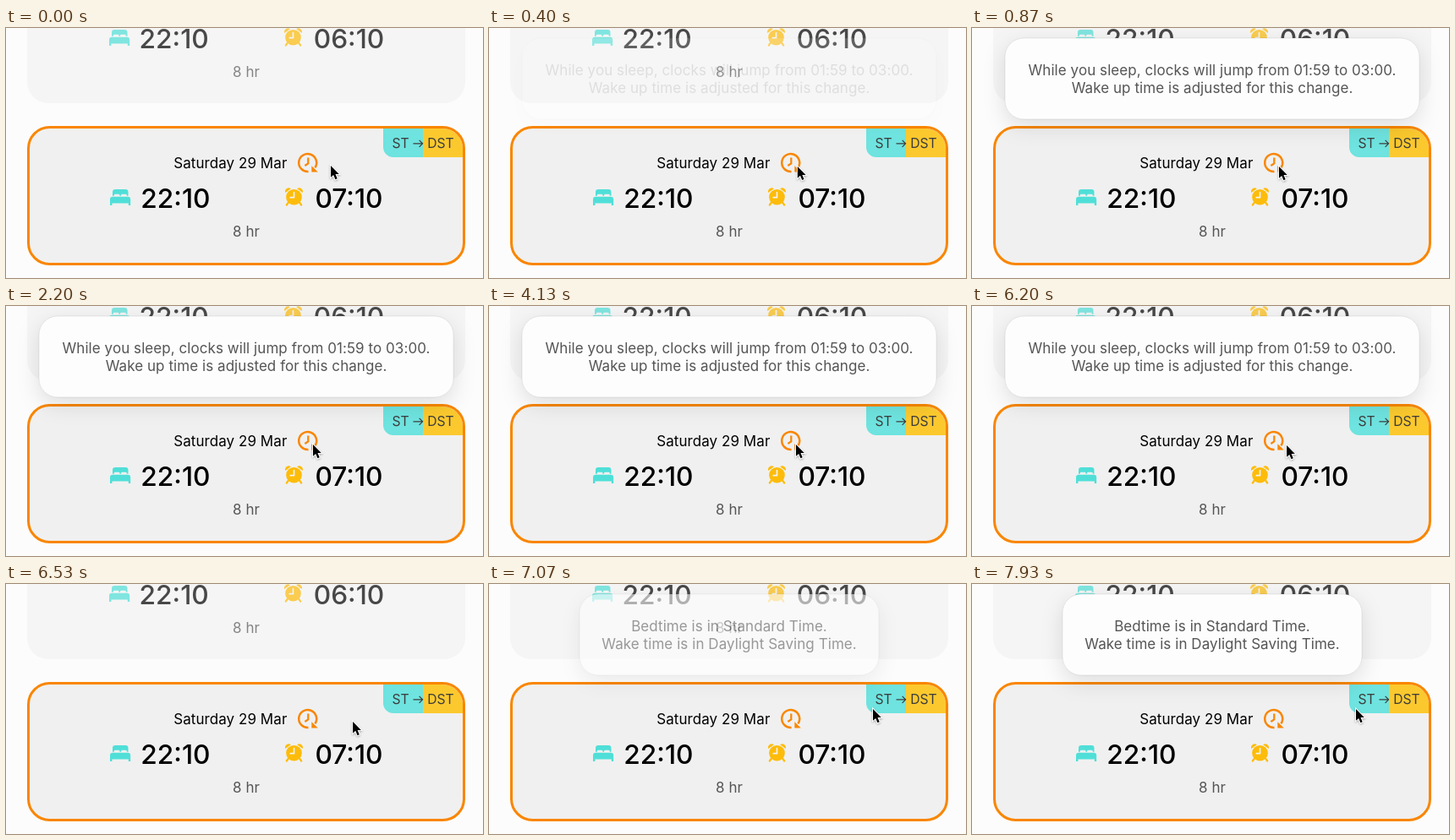
Recreate the animation shown at these times as an HTML page. Size 564 px wide and 296 px high, loop 8 s.

```html
<!DOCTYPE html>
<html lang="en">
<head>
<meta charset="utf-8">
<style>
  html, body { margin: 0; width: 100%; height: 100%; overflow: hidden; background: #fcfcfc; }
  svg { display: block; font: 17px Inter, sans-serif; letter-spacing: .06px; }
  .mid { text-anchor: middle; }
  .time { font-size: 31.700px; font-weight: 500; letter-spacing: 0; }
  .dim { fill: #555; }
  .badge { font-size: 15.700px; fill: #3c3c3c; letter-spacing: 0; }
  .tip { fill: #fdfdfd; stroke: #000; stroke-opacity: .1; stroke-width: .8; filter: url(#soft); }
</style>
</head>
<body>
<svg width="564" height="296" viewBox="0 0 564 296">
  <defs>
    <filter id="soft" x="-20%" y="-60%" width="140%" height="240%">
      <feDropShadow dx="0" dy="8" stdDeviation="13" flood-color="#000" flood-opacity=".12"/>
    </filter>
    <filter id="lift" x="-60%" y="-40%" width="220%" height="200%">
      <feDropShadow dx="0" dy="1" stdDeviation=".9" flood-color="#000" flood-opacity=".35"/>
    </filter>
    <clipPath id="tag">
      <path d="M446 119H516A24 24 0 0 1 540 143V153H458A12 12 0 0 1 446 141Z"/>
    </clipPath>
    <g id="bed" fill="#4fdfd8">
      <path d="M126 198.800V194.200Q126 191 129.200 191H141.300Q144.500 191 144.500 194.200V198.800H142.800V198.200Q142.800 196.800 141.400 196.800H137.400Q136 196.800 136 198.200V198.800H134.500V198.200Q134.500 196.800 133.100 196.800H129.100Q127.700 196.800 127.700 198.200V198.800Z"/>
      <path d="M123 210V203Q123 199.700 126.300 199.700H143.900Q147.200 199.700 147.200 203V210H144.800V207.400H125.400V210Z"/>
    </g>
    <g id="alarm" fill="#fdbc0a">
      <path d="M330.300 195A4.200 4.200 0 0 1 336.800 190.200ZM350.700 195A4.200 4.200 0 0 0 344.200 190.200Z"/>
      <circle cx="340.500" cy="200.200" r="9.300"/>
      <path d="M334 206.500L331.800 209.500M347 206.500L349.200 209.500" stroke="#fdbc0a" stroke-width="2.200" stroke-linecap="round"/>
      <path d="M340.500 194.600V200.700H336.300" fill="none" stroke="#f2f2f2" stroke-width="1.700" stroke-linecap="round" stroke-linejoin="round"/>
    </g>
  </defs>

  <rect width="564" height="296" fill="#fcfcfc"/>

  <rect x="25" y="-60" width="518" height="149" rx="25" fill="#f5f5f5"/>
  <g opacity=".7" transform="translate(0 -189)">
    <use href="#bed" x="-1"/>
    <use href="#alarm" x="-1"/>
    <text class="mid time" x="198.700" y="212.500">22:10</text>
    <text class="mid time" x="405.500" y="212.500">06:10</text>
    <text class="mid dim" x="284" y="247">8 hr</text>
  </g>

  <rect x="26.500" y="117.500" width="515" height="162" rx="25" fill="#f0f0f0"/>
  <g clip-path="url(#tag)">
    <rect x="446" y="119" width="48" height="34" fill="#6ee3df"/>
    <rect x="493" y="119" width="48" height="34" fill="#fbc92e"/>
  </g>
  <rect x="26.500" y="117.500" width="515" height="162" rx="25" fill="none" stroke="#f98600" stroke-width="3"/>
  <text class="badge mid" x="466.500" y="142.200">ST</text>
  <path d="M481.500 136.800H492.500M488.600 132.800L492.600 136.800L488.600 140.800" fill="none" stroke="#3c3c3c" stroke-width="1.200"/>
  <text class="badge mid" x="514" y="142.200">DST</text>

  <text class="mid" x="265.300" y="166">Saturday 29 Mar</text>
  <g fill="none" stroke="#f98600" stroke-width="2.500">
    <path d="M357.500 170A10.500 10.500 0 1 1 365.400 165.400"/>
    <path d="M361.300 163.200V170.400H368.800Z" fill="#f98600" stroke="none"/>
    <path d="M357.300 153.500V160.300L353.400 163" stroke-width="2.200"/>
  </g>
  <use href="#bed"/>
  <use href="#alarm"/>
  <text class="mid time" x="200.400" y="212.500">22:10</text>
  <text class="mid time" x="405.500" y="212.500">07:10</text>
  <text class="mid dim" x="284" y="247">8 hr</text>

  <g id="jump" opacity="0">
    <rect class="tip" x="39" y="12" width="490" height="96" rx="22"/>
    <text class="mid dim" x="284" y="56">While you sleep, clocks will jump from 01:59 to 03:00.</text>
    <text class="mid dim" x="284" y="77">Wake up time is adjusted for this change.</text>
  </g>
  <g id="zones" opacity="0">
    <rect class="tip" x="107" y="12" width="354" height="96" rx="22"/>
    <text class="mid dim" x="284" y="56">Bedtime is in Standard Time.</text>
    <text class="mid dim" x="284" y="77">Wake time is in Daylight Saving Time.</text>
  </g>

  <g id="cursor">
    <path d="M0 1V14.800L3.200 11.900L5.400 17.200L7.700 16.200L5.500 11H9.800Z" stroke="#fff" stroke-width="1.800" paint-order="stroke" filter="url(#lift)"/>
  </g>
</svg>
<script>
  const LOOP = 8000;
  // time, x, y of the pointer tip
  const PATH = [
    [0, 384, 162], [70, 384, 162], [200, 376, 162.4], [330, 367, 162.8], [460, 363, 163],
    [5850, 363, 163], [6050, 366, 163.6], [6200, 372, 164], [6350, 388, 163.8], [6530, 410, 162],
    [6800, 439, 153], [7000, 454, 147], [LOOP, 454, 147]
  ];
  const [jump, zones, cursor] = ['jump', 'zones', 'cursor'].map(id => document.getElementById(id));

  const ramp = (t, from, span) => {
    const p = Math.min(1, Math.max(0, (t - from) / span));
    return p * p * (3 - 2 * p);
  };

  function pointer(t) {
    const i = PATH.findIndex(k => k[0] > t);
    const [t0, x0, y0] = PATH[i - 1], [t1, x1, y1] = PATH[i];
    const p = (t - t0) / (t1 - t0);
    return [x0 + (x1 - x0) * p, y0 + (y1 - y0) * p];
  }

  function draw(t) {
    cursor.setAttribute('transform', `translate(${pointer(t)})`);
    jump.setAttribute('opacity', ramp(t, 350, 220) - ramp(t, 6230, 220));
    zones.setAttribute('opacity', ramp(t, 6950, 220));
  }

  const start = performance.now();
  (function tick() {
    draw((performance.now() - start) % LOOP);
    requestAnimationFrame(tick);
  })();
</script>
</body>
</html>
```
